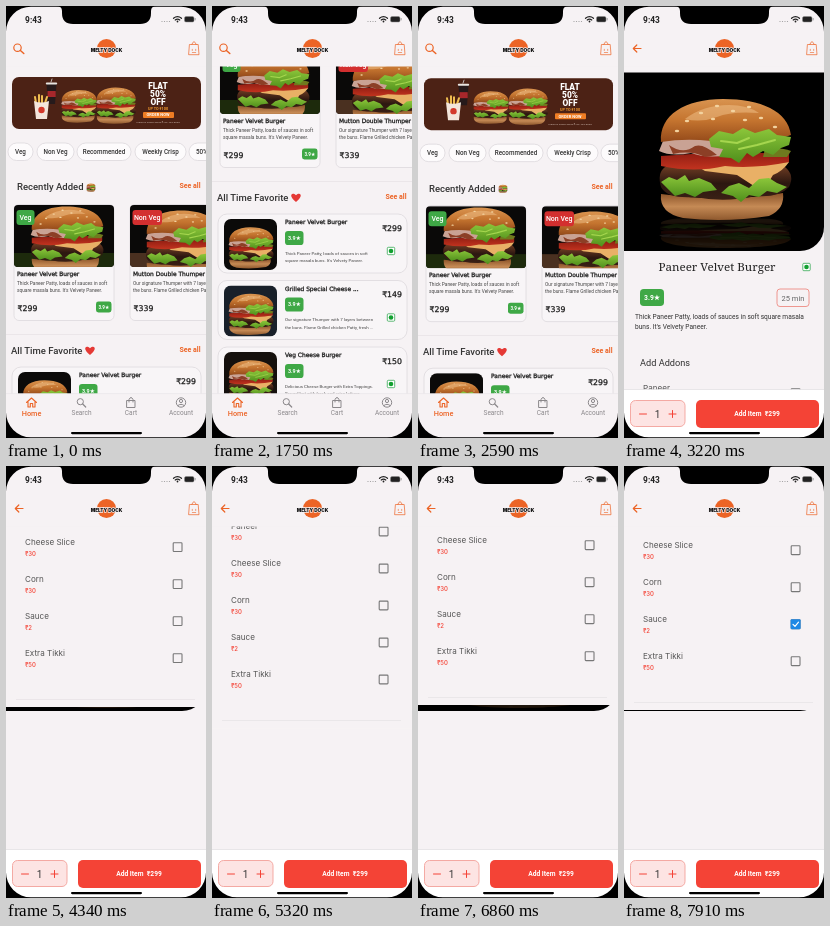
These frames come from a looping animation (200 px wide and 432 px high, 8000 ms). An HTML page:

```html
<!DOCTYPE html>
<html lang="en">
<head>
<meta charset="utf-8">
<title>Burger app</title>
<style>
html, body { margin: 0; width: 100%; height: 100%; overflow: hidden; background: #000; }
svg { display: block; width: 100vw; height: 100vh; }
text { font-family: Roboto, "Liberation Sans", sans-serif; white-space: pre; }
.wide { font-family: "DejaVu Sans", sans-serif; stroke: #222; stroke-width: .3px; }
.inter { font-family: Inter, sans-serif; }
.serif { font-family: "Noto Serif", serif; }
.mid { text-anchor: middle; }
.end { text-anchor: end; }
.med { font-weight: 500; }
.bold { font-weight: 700; }
.black { font-weight: 900; }
</style>
</head>
<body>
<svg id="stage" viewBox="0 0 200 432" preserveAspectRatio="none"></svg>
<script>
const BG = '#f6f2f4', ORANGE = '#ec6426', RED = '#f44336', GREEN = '#3fa846';
const DISH = 'Paneer Velvet Burger';

// y is the middle of the capitals
const text = (x, y, size, str, fill = '#333', cls = '') =>
  `<text x="${x}" y="${y + size * .36}" font-size="${size}" fill="${fill}" class="${cls}">${str}</text>`;
const rect = (x, y, w, h, r, fill, more = '') =>
  `<rect x="${x}" y="${y}" width="${w}" height="${h}" rx="${r}" fill="${fill}" ${more}/>`;
const path = (d, fill, more = '') => `<path d="${d}" fill="${fill}" ${more}/>`;
const line = (d, stroke, width = 1) =>
  path(d, 'none', `stroke="${stroke}" stroke-width="${width}" stroke-linecap="round" stroke-linejoin="round"`);
const circle = (x, y, r, fill, more = '') => `<circle cx="${x}" cy="${y}" r="${r}" fill="${fill}" ${more}/>`;
const ring = (x, y, r, stroke, width = 1) => circle(x, y, r, 'none', `stroke="${stroke}" stroke-width="${width}"`);
const burger = (x, y, k) => `<use href="#burger" transform="translate(${x} ${y}) scale(${k})"/>`;
const clip = (id, x, y, w, h, r) => `<clipPath id="${id}">${rect(x, y, w, h, r, '#000')}</clipPath>`;
const fade = (id, ...colors) => `<linearGradient id="${id}" x2="0" y2="1">` +
  colors.map((c, i) => `<stop offset="${i / (colors.length - 1)}" stop-color="${c}"/>`).join('') + '</linearGradient>';

const rating = (x, y, w, h, size) => rect(x, y, w, h, h * .22, GREEN) +
  text(x + w / 2, y + h / 2, size, '3.9★', '#fff', 'mid bold');
const vegMark = (x, y) => rect(x - 3.7, y - 3.7, 7.4, 7.4, 1, '#fff', 'stroke="#35a853" stroke-width=".8"') +
  circle(x, y, 2.3, '#12a030');

function burgerArt() {
  const seeds = [[-38, -30], [-24, -38], [-8, -45], [8, -40], [24, -44], [36, -33], [-12, -32], [20, -31], [-48, -20], [50, -24]];
  return `<g id="burger">` +
    path('M-64 43Q0 52 58 42Q60 58 44 65Q0 72-42 67Q-66 62-64 43Z', 'url(#base)') +
    path('M-60 16H60Q70 24 64 36Q54 47 30 45Q0 52-30 46Q-58 48-64 36Q-68 22-60 16Z', 'url(#patty)') +
    path('M-30 14L64 11Q58 20 48 24Q42 36 32 37L12 24L-20 20Z', '#e9b066') +
    path('M-64 5Q0-1 64 3V11Q30 18 0 15Q-30 22-64 15Z', 'url(#tomato)') +
    path('M-64 31L-56 26L-48 29L-40 24L-36 30L-26 27L-14 32L-8 39L-22 41L-30 46L-40 42L-50 45Z', 'url(#leaf)') +
    path('M-4 42L4 35L14 32L24 37L34 28L44 27L52 32L62 36L52 42L42 40L34 46L24 44L16 51L8 45Z', 'url(#leaf)') +
    path('M-62-10Q-30-16 0-10L4 4Q-18 8-34 2Q-54 6-66 0Z', '#c9a294') +
    path('M-56-6Q-42 4-30-5Q-22-8-8 4L-20 6Q-34-1-52 3Z', '#8c3f26') +
    path('M40-2Q56-4 66 0L62 6H38Z', '#6f7a1e') +
    path('M-64-9C-66-36-40-52-2-52S63-40 66-16Q50-10 34-12Q0-16-14-10Q-40-13-64-9Z', 'url(#bun)') +
    path('M-40-32Q-22-46 4-46Q22-46 34-38Q6-40-8-34Q-24-28-40-32Z', '#efbe86', 'opacity=".55"') +
    path('M-16-12L-6-20L8-17L18-23L30-18L44-22L52-16L66-14L64-6L56-3L48 4L38 0L28 6L22 2L14 12L6 7L-6 6L-2-2L-14-4Z', 'url(#leaf)') +
    line('M-4-10L12-8L24-13M14-2L32-6L50-11', '#a5d64e', 2) +
    seeds.map(([x, y]) => `<ellipse cx="${x}" cy="${y}" rx="2.2" ry="1.2" fill="#f3d3a0"/>`).join('') + `</g>`;
}

const defs = '<defs>' + fade('bun', '#d99450', '#c4742f', '#944a1a') + fade('base', '#8a5228', '#c58a55', '#8f592e') +
  fade('patty', '#6a3a22', '#2c1710', '#3a2015') + fade('leaf', '#8cc63a', '#4f8f1c') + fade('tomato', '#8f1d12', '#c2331f') +
  burgerArt() + clip('pic1', 8, 199, 100, 62, 4) + clip('pic2', 124, 199, 100, 62, 4) +
  [0, 1, 2].map(i => clip('thumb' + i, 12, 366 + i * 66.5, 53, 51, 7)).join('') + '</defs>';

const header = left => rect(0, 0, 200, 60.5, 0, BG) + left +
  circle(100.5, 42.5, 9.5, ORANGE) +
  `<text x="100.5" y="46" font-size="4.7" fill="#111" stroke="${BG}" stroke-width="1.4" paint-order="stroke" class="mid black inter">MELTY DOCK</text>` +
  line('M183.8 38.5H192.2L193 48.7H183ZM185.8 38.5Q188 32.5 190.2 38.5', ORANGE, .7) +
  line('M186.3 43.3V44.5M189.7 43.3V44.5M186.3 46.5H189.7', ORANGE, .6);

function banner() {
  const words = [[79.5, 'FLAT'], [88, '50%'], [96, 'OFF']];
  return rect(6, 71, 189, 52, 7, '#4c2215') +
    path('M40.5 78H50.5L49 98H42Z', '#261a1b') + rect(39.8, 76.5, 11.4, 2, 1, '#e8e4e0') +
    rect(41.5, 85, 8.2, 6, 0, '#a8272b') + line('M45 76L46 73', '#ddd', .8) +
    line('M30 97L29 91M33 97V89M36 97V90M39 97L41 91', '#efbd51', 2) +
    path('M28 95Q35 98 43 95L41 113H30Z', '#f3e6dc') + circle(35.5, 104, 3.2, '#d3392b') +
    burger(73, 98, .27) + burger(110, 97, .3) +
    words.map(([y, s]) => text(152, y, 8.4, s, '#fff', 'mid black')).join('') +
    text(152, 102.5, 3.8, 'UP TO ₹100', '#f39a2d', 'mid bold') +
    rect(137, 106, 31, 6, 1, '#ef7d24') + text(152, 109, 4, 'ORDER NOW', '#fff', 'mid bold') +
    text(152, 116.5, 2.5, '*Valid on orders above ₹199. T&amp;C apply', '#d8c4ba', 'mid');
}

const chip = ([x, w, label]) => rect(x, 137, w, 17.5, 8.7, '#fdfbfc', 'stroke="#d9d5d8" stroke-width=".7"') +
  text(x + w / 2, 145.8, 6.3, label, '#333', 'mid med');

const heading = (x, y, label) => text(x, y, 9.5, label, '#333', 'med') + text(173.5, y - 1.5, 7, 'See all', ORANGE, 'bold');

function card(x, id, o) {
  return rect(x, 198.5, 100, 116, 5, '#f8f5f7', 'stroke="#dedadd" stroke-width=".8"') +
    `<g clip-path="url(#${id})">${rect(x, 199, 100, 62, 0, '#0a0908')}${rect(x, 247, 100, 14, 0, o.table)}${burger(x + o.bx, o.by, .55)}</g>` +
    rect(x + 2.5, 204, o.tagW, 15, 3, o.tagFill) +
    text(x + 2.5 + o.tagW / 2, 211.5, 7, o.tag, '#fff', 'mid med') +
    text(x + 3, 267.5, 5.9, o.name, '#222', 'wide') +
    o.info.map((s, i) => text(x + 3, 276.8 + i * 7.2, 4.8, s, '#444')).join('') +
    text(x + 3.5, 302, 7.8, o.price, '#222', 'wide') + rating(x + 82, 295.5, 15.5, 11, 4.6);
}

function listItem([name, price, info], i) {
  const y = 361 + i * 66.5;
  return rect(6, y, 189, 59, 9, '#f8f5f7', 'stroke="#dedadd" stroke-width=".8"') +
    `<g clip-path="url(#thumb${i})">${rect(12, y + 5, 53, 51, 0, ['#0b0a09', '#19202a', '#15100d'][i])}${burger(39, y + 31, .34)}</g>` +
    text(73, y + 8, 5.9, name, '#222', 'wide') + rating(73, y + 17, 18.5, 14, 5.4) +
    info.map((s, k) => text(73, y + 39.2 + k * 7.3, 4.4, s, '#444')).join('') +
    text(190, y + 14, 7.8, price, '#222', 'wide end') + vegMark(179, y + 37);
}

function tabBar() {
  const grey = '#8b888b';
  return rect(0, 387.5, 200, 45, 0, BG) + rect(0, 387.5, 200, .6, 0, '#e8e4e7') +
    line('M20.5 396.5L25.5 392L30.5 396.5M22 396V401H24.3V397.5H26.7V401H29V396', ORANGE, 1.1) +
    ring(74.3, 395.7, 3.1, grey) + line('M76.7 398L79.7 401', grey, 1.2) +
    line('M121 394.5H129V401.5H121ZM123 396V393.5Q125 389.5 127 393.5V396', grey) +
    ring(175, 396.5, 4.7, grey) + ring(175, 395, 1.6, grey) + line('M171.8 399.6Q175 396.8 178.2 399.6', grey) +
    text(25.5, 407, 7.3, 'Home', ORANGE, 'mid med') +
    [[75.5, 'Search'], [125, 'Cart'], [175, 'Account']].map(([x, s]) => text(x, 407, 6.5, s, grey, 'mid')).join('');
}

function homePage() {
  const chips = [[2, 25, 'Veg'], [31, 37, 'Non Veg'], [71, 54, 'Recommended'], [129, 51, 'Weekly Crisp'], [183, 36, '50% Off']];
  const paneer = ['Thick Paneer Patty, loads of sauces in soft', "square masala buns. It's Velvety Paneer."];
  const mutton = ['Our signature Thumper with 7 layers between', 'the buns. Flame Grilled chicken Patty, fresh ...'];
  const cheese = ['Delicious Cheese Burger with Extra Toppings.', 'Served hot with fresh and crisp lettuce.'];
  const cards = [
    { table: '#1d2a0c', bx: 53, by: 229, tag: 'Veg', tagW: 18, tagFill: GREEN, name: DISH, price: '₹299', info: paneer },
    { table: '#4a3020', bx: 52, by: 233, tag: 'Non Veg', tagW: 29.5, tagFill: '#d32f2f',
      name: 'Mutton Double Thumper', price: '₹339', info: mutton }
  ];
  const items = [[DISH, '₹299', paneer], ['Grilled Special Cheese ...', '₹149', mutton], ['Veg Cheese Burger', '₹150', cheese]];
  return `<g id="home">${rect(0, 0, 200, 432, 0, BG)}<g id="feed">` + banner() + chips.map(chip).join('') +
    heading(11, 181, 'Recently Added') + burger(85, 181, .068) +
    card(8, 'pic1', cards[0]) + card(124, 'pic2', cards[1]) + rect(0, 328, 200, .6, 0, '#e4e0e3') +
    heading(5, 344.5, 'All Time Favorite') +
    path('M84 349C76 343 79.5 338.5 84 342.2C88.5 338.5 92 343 84 349Z', '#e53935') +
    items.map(listItem).join('') + '</g>' +
    header(ring(11.5, 41.7, 3.7, ORANGE, 1.2) + line('M14.4 44.5L17.8 47.5', ORANGE, 1.5)) +
    tabBar() + '</g>';
}

function addon([name, price], i) {
  const y = 382 + i * 37;
  return text(19, y, 8.1, name, '#555', 'inter') + text(19, y + 11.5, 6, price, RED, 'inter med') +
    rect(167.2, y + .8, 8.8, 8.8, .8, 'none', 'stroke="#777" stroke-width="1.1"');
}

function detailPage() {
  const addons = [['Paneer', '₹30'], ['Cheese Slice', '₹30'], ['Corn', '₹30'], ['Sauce', '₹2'], ['Extra Tikki', '₹50']];
  return `<g id="detail">${rect(0, 0, 200, 432, 0, BG)}` +
    path('M0 66.4H200V221A24 24 0 0 1 176 245H0Z', '#000') +
    '<use href="#burger" transform="translate(101 229) scale(1 -.25)" opacity=".14"/>' + burger(101, 145, 1) +
    `<g id="sheet">` + path('M0 245H200V584H0Z', BG) +
    text(93, 261, 11.6, DISH, '#222', 'mid serif') + vegMark(182.5, 261) +
    rating(16, 283, 24, 17, 6.8) +
    rect(153, 283, 32, 17.5, 3, 'none', 'stroke="#ee8c84" stroke-width=".9"') + text(169, 291.8, 7.5, '25 min', '#666', 'mid') +
    text(11, 311, 6.6, 'Thick Paneer Patty, loads of sauces in soft square masala') +
    text(11, 321, 6.6, "buns. It's Velvety Paneer.") +
    text(16, 357, 9.2, 'Add Addons') + addons.map(addon).join('') +
    `<g id="tick">${rect(166.6, 493.2, 10, 10, 1, '#1e88e5')}${line('M169 498.3L171 500.3L174.5 496.1', '#fff', 1.2)}</g>` +
    rect(10, 576, 179, .7, 0, '#e6e2e5') + '</g>' +
    rect(0, 383.4, 200, 49, 0, '#fff') + rect(0, 383.2, 200, .6, 0, '#dddadc') +
    rect(6.5, 394.5, 54.5, 26, 5, '#fde4e3', 'stroke="#f3a29b" stroke-width=".9"') +
    line('M15.5 408H22.5M45 408H52M48.5 404.5V411.5', RED) + text(33.5, 408, 10, '1', '#333', 'mid') +
    rect(72, 394, 123, 28, 5, RED) + text(133, 408, 6.7, 'Add Item  ₹299', '#fff', 'mid bold') +
    header(line('M17 42.5H9.5M12.8 39L9.3 42.5L12.8 46', ORANGE, 1.2)) + '</g>';
}

function phone() {
  return text(27.5, 13.5, 8.4, '9:43', '#222', 'mid bold') +
    [156, 158.5, 161, 163.5].map(x => circle(x, 15.5, .6, '#999')).join('') +
    line('M167.5 12.3Q171.5 9 175.5 12.3M169.2 14Q171.5 12.2 173.8 14', '#222', 1.2) + circle(171.5, 15.5, .9, '#222') +
    rect(178.5, 10.5, 9.5, 5.5, 1.5, '#222', 'stroke="#888" stroke-width=".5"') + rect(188.7, 12, .8, 2.5, .4, '#888') +
    path('M50 0Q56 0 56 5V7Q56 18 67 18H134Q145 18 145 7V5Q145 0 151 0Z', '#000') +
    rect(65, 426, 71, 2.2, 1.1, '#000') +
    path('M0 0H200V432H0ZM25 .7A25 25 0 0 0 0 25.7V406.3A25 25 0 0 0 25 431.3H175A25 25 0 0 0 200 406.3V25.7A25 25 0 0 0 175 .7Z',
      '#000', 'fill-rule="evenodd"');
}

document.getElementById('stage').innerHTML = defs + homePage() + detailPage() + phone();
const [home, feed, detail, sheet, tick] = ['home', 'feed', 'detail', 'sheet', 'tick'].map(id => document.getElementById(id));

const feedScroll = [[1260, 0], [1400, 28], [1540, 100], [1680, 146], [1750, 153], [1860, 150], [1960, 95], [2080, -15],
  [2170, -51], [2250, -47], [2380, -20], [2520, -4], [2660, 0]];
const push = [[2700, 0], [2800, .3], [2900, .68], [3000, .9], [3100, .98], [3200, 1]];
const sheetScroll = [[3780, 0], [3920, 50], [4060, 190], [4200, 315], [4340, 343], [4480, 345], [4690, 342.5], [4970, 340],
  [5250, 340], [5390, 285], [5530, 155], [5670, 55], [5810, 14], [6090, 0],
  [6160, 0], [6300, 45], [6440, 180], [6580, 305], [6720, 343], [6860, 345], [7140, 342], [7700, 340]];
const check = [[7780, 0], [7910, 1]];

// Smooth curve through [time, value] points without overshoot
function at(keys, t) {
  const last = keys.length - 1;
  if (t <= keys[0][0]) return keys[0][1];
  if (t >= keys[last][0]) return keys[last][1];
  const i = keys.findIndex(k => k[0] > t) - 1;
  const slope = j => (keys[j + 1][1] - keys[j][1]) / (keys[j + 1][0] - keys[j][0]);
  const tangent = j => {
    if (j < 1 || j >= last) return 0;
    const a = slope(j - 1), b = slope(j);
    return a * b > 0 ? 2 * a * b / (a + b) : 0;
  };
  const [t0, v0] = keys[i], [t1, v1] = keys[i + 1], h = t1 - t0, u = (t - t0) / h, w = 1 - u;
  return w * w * ((1 + 2 * u) * v0 + u * h * tangent(i)) + u * u * ((3 - 2 * u) * v1 - w * h * tangent(i + 1));
}

const move = (el, x, y) => el.setAttribute('transform', `translate(${x} ${y})`);
const start = performance.now();

function frame() {
  const t = (performance.now() - start) % 8000, p = at(push, t);
  move(feed, 0, -at(feedScroll, t));
  move(home, -60 * p, 0);
  move(detail, 200 * (1 - p), 0);
  move(sheet, 0, -at(sheetScroll, t));
  tick.setAttribute('opacity', at(check, t));
  requestAnimationFrame(frame);
}
frame();
</script>
</body>
</html>
```
